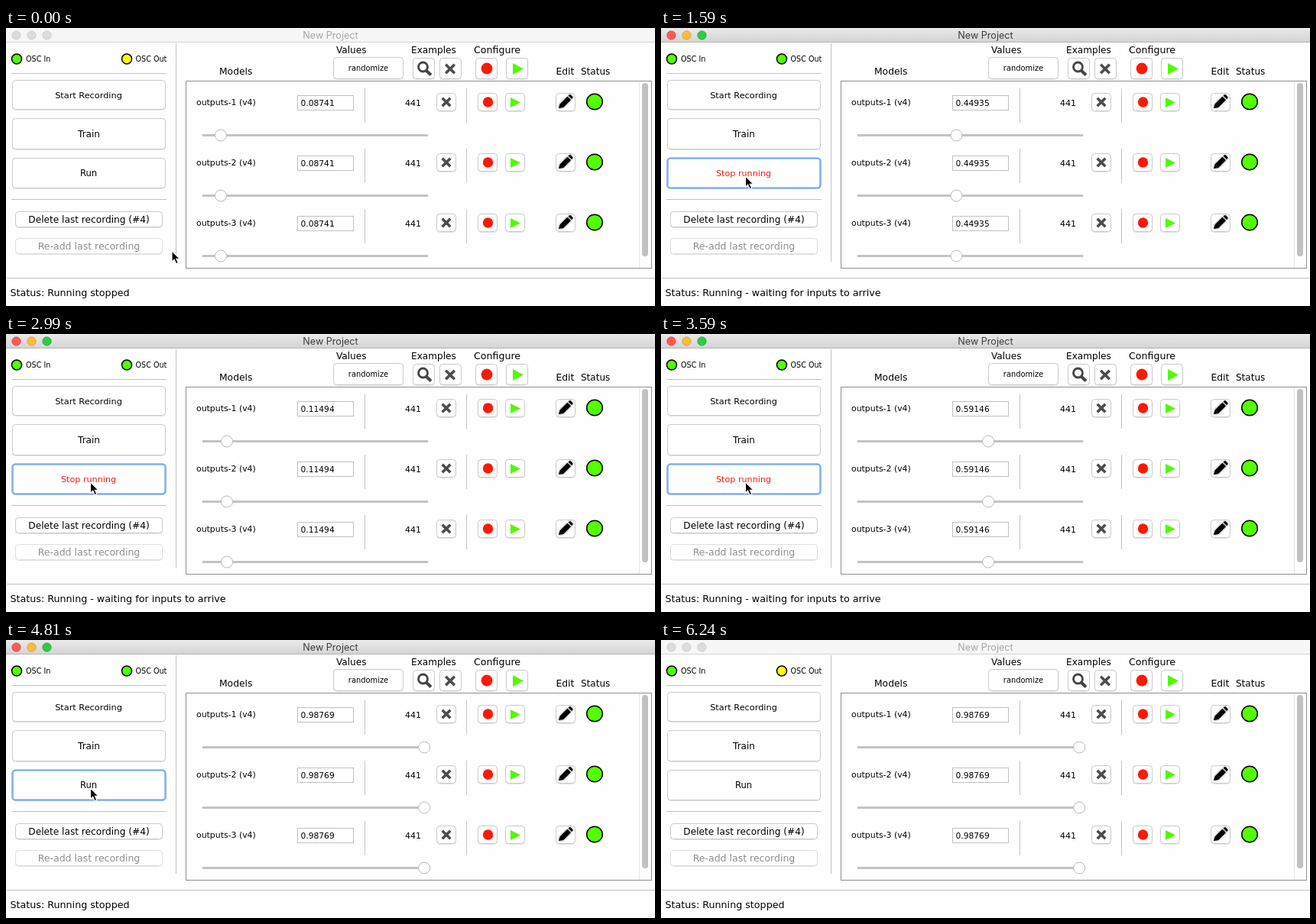
Animation of 849 by 364 pixels, one loop 6320 ms. Source, as an HTML page:

```html
<!DOCTYPE html>
<html lang="en">
<head>
<meta charset="utf-8">
<title>New Project</title>
<style>
  html, body { margin: 0; width: 100%; height: 100%; overflow: hidden; background: #fefefe; }
  svg { display: block; width: 849px; height: 364px; font-family: "DejaVu Sans", sans-serif; }
  .title { font-family: Inter, sans-serif; }
  .line { stroke: #c3c3c3; fill: none; }
  text { white-space: pre; }
</style>
</head>
<body>
<svg id="stage" viewBox="0 0 849 364">
  <defs>
    <linearGradient id="bar" x2="0" y2="1">
      <stop stop-color="#eaeaea"/><stop offset="1" stop-color="#d3d3d3"/>
    </linearGradient>
    <filter id="soft" x="-50%" y="-50%" width="200%" height="200%">
      <feGaussianBlur stdDeviation="1.4"/>
    </filter>
  </defs>
</svg>
<script>
const LOOP = 6320, STEP = 87.3, START = 180;
const stage = document.getElementById('stage');
const $ = id => document.getElementById(id);

const text = (x, y, str, size, attrs = '') =>
  `<text x="${x}" y="${y}" font-size="${size}" ${attrs}>${str}</text>`;
const centred = (x, y, str, size, attrs = '') =>
  text(x, y, str, size, `text-anchor="middle" ${attrs}`);
const line = d => `<path class="line" d="${d}"/>`;
const disc = (x, y, r, fill, attrs = '') =>
  `<circle cx="${x}" cy="${y}" r="${r}" fill="${fill}" ${attrs}/>`;
const lamp = (x, y, r, fill, id = '') =>
  disc(x, y, r, fill, `id="${id}" stroke="#000" stroke-width="1.5"`);

const button = (x, y, w, h, edge = '#c9c9c9') =>
  `<rect x="${x + .5}" y="${y + 1.5}" width="${w - 1}" height="${h - 1}" rx="4" fill="none" stroke="#e2e2e2"/>
   <rect x="${x + .5}" y="${y + .5}" width="${w - 1}" height="${h - 1}" rx="4" fill="#fff" stroke="${edge}"/>`;

const cross = (x, y, r) =>
  `<path d="M${x - r} ${y - r}l${2 * r} ${2 * r}m0 ${-2 * r}l${-2 * r} ${2 * r}" stroke="#4c4c4c" stroke-width="3.6"/>`;
const play = (x, y, w, h) =>
  `<path d="M${x} ${y - h / 2}l${w} ${h / 2}l${-w} ${h / 2}z" fill="#50fa00"/>`;

const pencilShape = 'M-9 8l1.6-5.6L2.4-7.3 6.9-2.8-2.9 7zM3.6-8.4l1.3-1.2q1-.7 1.9 0l2.4 2.5q.8 1 0 1.9L8.1-4z';
const pencil = (x, y) => `<g transform="translate(${x} ${y})">
  <path d="${pencilShape}" fill="#777" filter="url(#soft)"/><path d="${pencilShape}"/></g>`;

function row(i) {
  return `<g transform="translate(0 ${79 * i})">
    ${text(249, 101, `outputs-${i + 1} (v4)`, 10.9)}
    <rect x="381.5" y="88.5" width="73" height="19" fill="#fff" stroke="#c0c0c0"/>
    ${text(385.5, 102, '', 10.7, 'class="value"')}
    ${line('M469.5 79V124M602.5 79V124')}
    ${text(522, 102, '441', 11)}
    ${[563, 617, 653, 719].map(x => button(x, 85, 26, 24)).join('')}
    ${cross(576, 97, 5.3)}
    ${disc(630.5, 97, 6.7, '#ff1800')}
    ${play(660, 97.5, 13, 13)}
    ${pencil(732, 97)}
    ${lamp(770, 96.5, 10.3, '#54ff00')}
    <path d="M258 140.5H551" stroke="#c3c3c3" stroke-width="3" stroke-linecap="round"/>
    ${disc(0, 140.5, 7.5, '#fff', 'class="thumb" stroke="#b9b9b9"')}
  </g>`;
}

stage.insertAdjacentHTML('beforeend', `
  <rect width="849" height="364" fill="#fefefe"/>
  <rect id="titleBar" width="849" height="19"/>
  <path id="titleEdge" d="M0 18.5H849"/>
  ${[13.5, 33.5, 53.5].map(x => disc(x, 9.5, 5.6, '#ddd', 'class="light"')).join('')}
  ${centred(424.5, 14, 'New Project', 12.6, 'id="title" class="title"')}
  ${line('M222.5 20V306M7 59.5H210M7 224.5H210M1 327.5H849')}
  ${lamp(14, 40.5, 6.5, '#54ff00')}${text(26, 44, 'OSC In', 9.6)}
  ${lamp(158, 40.5, 6.5, '#ff0', 'oscOut')}${text(169.5, 44, 'OSC Out', 9.6)}
  ${button(8, 68, 201, 39)}${centred(108, 92, 'Start Recording', 11.3)}
  ${button(8, 118, 201, 41)}${centred(108.5, 143, 'Train', 12)}
  ${button(8, 170, 201, 40)}
  <rect id="ring" x="8.5" y="170.5" width="200" height="39" rx="4" fill="#fff" stroke="#83b0ee" stroke-width="2.6"/>
  ${centred(108, 194, 'Run', 11.5, 'id="run"')}
  ${button(12, 240, 193, 21)}${centred(108.5, 255, 'Delete last recording (#4)', 12.15)}
  ${button(12, 275, 193, 21, '#dedede')}
  ${centred(108.5, 290, 'Re-add last recording', 12.5, 'fill="#8c8c8c"')}
  ${text(5.5, 351, '', 12.7, 'id="status"')}
  ${text(279, 61, 'Models', 12.3)}${text(432, 33, 'Values', 12.1)}
  ${text(530, 33, 'Examples', 12.1)}${text(612, 33, 'Configure', 12.6)}
  ${text(719.5, 61, 'Edit', 12.3)}${text(752, 61, 'Status', 12)}
  ${button(428, 38, 92, 29)}${centred(474, 56, 'randomize', 9.9)}
  ${[532, 567, 614, 654].map(x => button(x, 39, 29, 28)).join('')}
  <path d="M550 56l6 5.5" stroke="#444" stroke-width="4"/>
  ${disc(545.5, 51, 6, '#fff', 'stroke="#444" stroke-width="2.8"')}
  ${cross(581, 53.5, 5.8)}
  ${disc(629, 53, 7.4, '#ff1800')}
  ${play(663, 53.5, 14, 15)}
  <rect x="235.5" y="69.5" width="609" height="245" fill="none" stroke="#8f8f8f"/>
  <path d="M828.5 70V314" stroke="#e6e6e6"/>
  <rect x="832" y="72" width="8" height="227" rx="4" fill="#c1c1c1"/>
  ${[0, 1, 2].map(row).join('')}
  <path id="cursor" d="M0 0V14.2L3.2 11.2 5.6 16.7 8.2 15.6 5.8 10.2H10.2Z" stroke="#fff" stroke-width="1.1"/>
`);

// [step, output value]
const keys = [[12, .08741], [18, .57], [20, 1], [22, .3697], [24, .115], [27, 1],
  [32, .11494], [35, .067], [42, .925], [47, .98206], [50, .98769]];

function output(n) {
  if (n <= keys[0][0]) return keys[0][1];
  const i = keys.findIndex(k => k[0] >= n);
  if (i < 0) return keys[keys.length - 1][1];
  const [n0, v0] = keys[i - 1], [n1, v1] = keys[i];
  return v0 + (v1 - v0) * (1 - Math.cos(Math.PI * (n - n0) / (n1 - n0))) / 2;
}

function pointer(t, n) {
  const along = (a, b, p) => a.map((c, i) => c + (b[i] - c) * p);
  const onRun = [110.5, 194];
  if (t < 5350) {
    const p = Math.min(Math.max((n + 1) / 8, 0), 1);
    return along([217, 292], onRun, (1 - Math.cos(Math.PI * p)) / 2);
  }
  return along(onRun, [600, 344], Math.min(Math.floor((t - 5350) / 87) + 1, 3) / 3);
}

function set(node, attrs) {
  for (const name in attrs) node.setAttribute(name, attrs[name]);
}

function draw(t) {
  const n = Math.floor((t - START) / STEP);
  const active = t >= 880 && t < 6240;
  const running = t >= 1240 && t < 4720;

  set($('titleBar'), { fill: active ? 'url(#bar)' : '#f6f6f6' });
  set($('titleEdge'), { stroke: active ? '#b4b4b4' : '#d5d5d5' });
  set($('title'), { fill: active ? '#3c3c3c' : '#a6a6a6' });
  document.querySelectorAll('.light').forEach((node, i) => set(node, {
    fill: active ? ['#fc5b57', '#fdbc40', '#34c84a'][i] : '#dcdcdc',
    stroke: active ? ['#e2463f', '#dfa023', '#27aa35'][i] : '#cfcfcf'
  }));

  set($('ring'), { visibility: t >= 1150 && t < 6240 ? 'visible' : 'hidden' });
  set($('oscOut'), { fill: t >= 1240 && t < 5440 ? '#54ff00' : '#ff0' });
  $('run').textContent = running ? 'Stop running' : 'Run';
  set($('run'), { fill: running ? '#f01a10' : '#000', 'font-size': running ? 11.2 : 11.6 });
  $('status').textContent = 'Status: Running ' + (running ? '- waiting for inputs to arrive' : 'stopped');

  const v = output(n);
  const x = 255.5 + 291 * v + 4.5 * v ** 4;
  document.querySelectorAll('.value').forEach(node => node.textContent = +v.toFixed(5));
  document.querySelectorAll('.thumb').forEach(node => set(node, { cx: x }));

  set($('cursor'), {
    transform: `translate(${pointer(t, n)})`,
    visibility: t < 5610 ? 'visible' : 'hidden'
  });
}

const begin = performance.now();
function tick() {
  draw((performance.now() - begin) % LOOP);
  requestAnimationFrame(tick);
}
tick();
</script>
</body>
</html>
```
